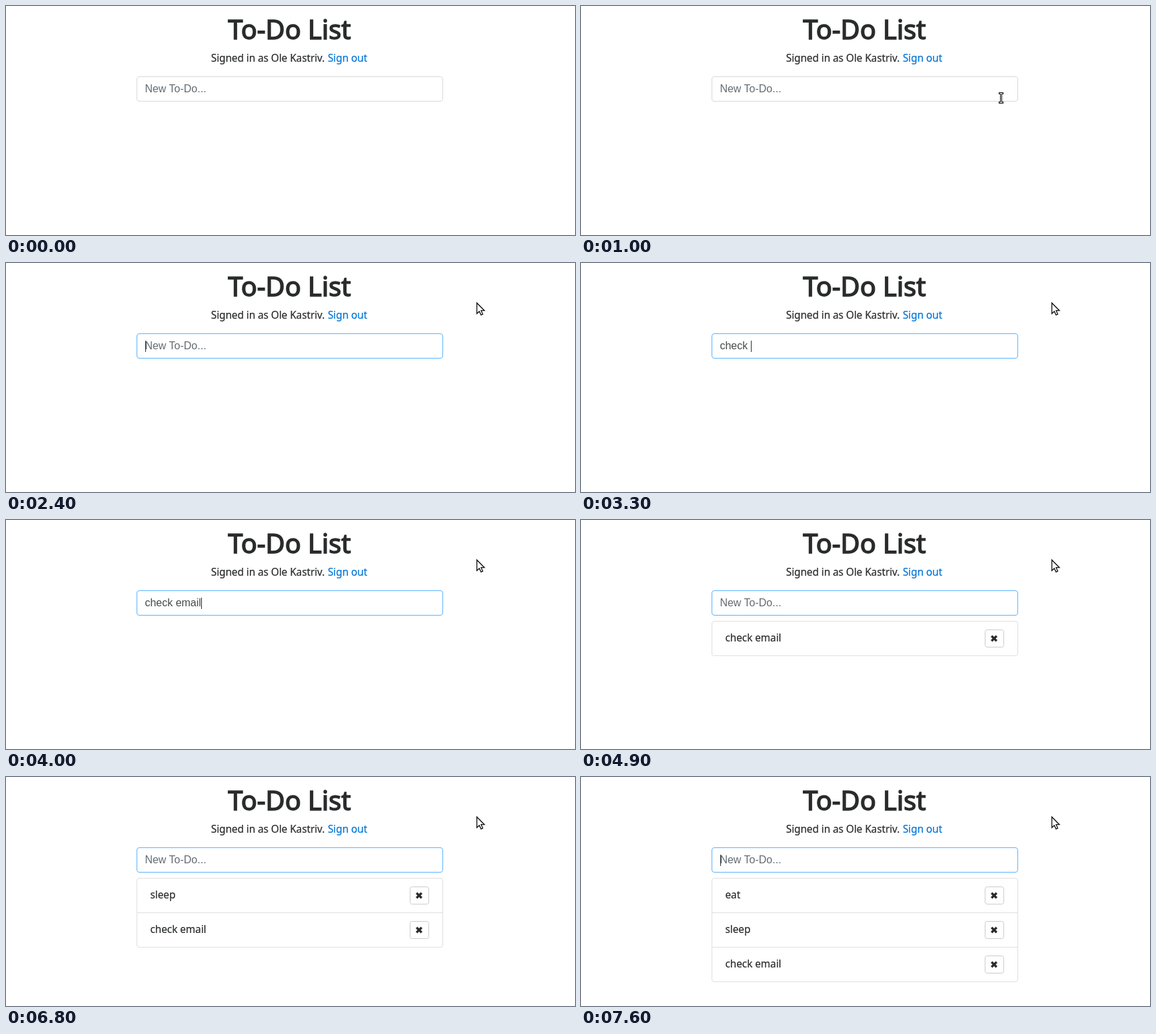
Write an HTML page that moves like this. It is 854 by 345 pixels and loops after 8 s.

```html
<!DOCTYPE html>
<html lang="en">
<head>
<meta charset="utf-8">
<title>To-Do List</title>
<style>
  html, body { margin: 0; width: 100%; height: 100%; overflow: hidden; background: #fff; }
  svg { display: block; }
  text {
    font: 15.4px "Noto Sans", "Open Sans", sans-serif; letter-spacing: -.08px; white-space: pre;
    fill: #292b2c; stroke: #292b2c; stroke-width: .2px;
  }
  #title { font-size: 39.8px; letter-spacing: 0; stroke-width: 1.5px; text-anchor: middle; }
  #link { fill: #0275d8; stroke: #0275d8; }
  #value { font: 16px "Liberation Sans", Arial, sans-serif; letter-spacing: 0; stroke: none; }
  .box { fill: #fff; stroke: #d9d9d9; }
  .list { fill: none; stroke: #dfdfdf; }
  .button { fill: #fff; stroke: #ccc; }
  .cross { stroke: #292b2c; stroke-width: 3.4; }
</style>
</head>
<body>
<svg width="854" height="345" viewBox="0 0 854 345">
  <defs>
    <g id="row">
      <rect class="button" x="606.5" y="165.5" width="28" height="26" rx="3"/>
      <path class="cross" d="M616.2 174.7L623.8 182.3M623.8 174.7L616.2 182.3"/>
    </g>
  </defs>
  <text id="title" x="425.5" y="50">To-Do List</text>
  <text x="307.8" y="84">Signed in as Ole Kastriv.</text>
  <text id="link" x="483" y="84">Sign out</text>
  <rect id="input" class="box" x="196.5" y="106.5" width="459" height="37" rx="3.5"/>
  <text id="value" x="208.4" y="130"></text>
  <rect id="caret" y="117" width="1" height="17" fill="#292b2c"/>
  <g id="rows"></g>
  <rect id="frame" class="list" x="196.5" y="152.5" width="459" rx="3.5"/>
  <path id="arrow" d="M.7 1.2V17.2L4.4 13.9L7 19.4L9.6 18.2L7.1 12.7H12Z"
        fill="#fff" stroke="#111" stroke-width="1.3"/>
  <g id="beam">
    <g transform="translate(-.5 .5)">
      <path d="M-3.5 -7H3.5M0 -7V7M-3.5 7H3.5" stroke="#000" stroke-width="3"/>
      <path d="M-2.5 -7H2.5M0 -7V7M-2.5 7H2.5" stroke="#fff"/>
    </g>
  </g>
</svg>
<script>
const LOOP = 8000, CLICK = 1200, BLINK = 600;
const tasks = [
  { text: "check email", done: 4300,
    keys: [2500, 2800, 2900, 3100, 3200, 3300, 3400, 3600, 3700, 3800, 4000] },
  { text: "sleep", done: 6200, keys: [5100, 5200, 5400, 5600, 5800] },
  { text: "eat", done: 7600, keys: [6900, 7000, 7100] }
];
const events = [CLICK, ...tasks.flatMap(task => [...task.keys, task.done])];
const $ = id => document.getElementById(id);
const show = (el, on) => el.setAttribute("visibility", on ? "visible" : "hidden");
const pen = document.createElement("canvas").getContext("2d");
pen.font = '16px "Liberation Sans", Arial, sans-serif';

function pointerAt(t) {
  const clamp = v => Math.min(1, Math.max(0, v));
  const far = (1 - clamp((t - 400) / 700)) ** 2;
  const p = clamp((t - 1300) / 500), away = p * p * (3 - 2 * p);
  return [629 + 85 * far + 77 * away, 134 + 196 * far - 75 * away].map(Math.round);
}

function drawInput(t) {
  const task = tasks.find(task => t < task.done);
  const typed = task ? task.text.slice(0, task.keys.filter(k => k <= t).length) : "";
  $("value").textContent = typed || "New To-Do...";
  $("value").style.fill = typed ? "#464a4c" : "#636c72";
  $("input").style.stroke = t > CLICK ? "#5cb3fd" : "";
  const last = Math.max(...events.filter(e => e <= t));
  $("caret").setAttribute("x", Math.round(208.9 + pen.measureText(typed).width));
  show($("caret"), t >= CLICK && (t - last) % (2 * BLINK) < BLINK);
}

let shown = -1;
function drawList(t) {
  const done = tasks.filter(task => task.done <= t).reverse();
  if (done.length === shown) return;
  shown = done.length;
  $("rows").innerHTML = done.map((task, i) =>
    `<g transform="translate(0 ${52 * i})"><use href="#row"/>` +
    (i ? '<path class="list" d="M197 152.5H655"/>' : "") +
    `<text x="216.5" y="183">${task.text}</text></g>`).join("");
  $("frame").setAttribute("height", 52 * shown);
  show($("frame"), shown);
}

function drawPointer(t) {
  const [x, y] = pointerAt(t);
  const inside = x < 656 && y >= 106 && y < 144;
  for (const id of ["arrow", "beam"])
    $(id).setAttribute("transform", `translate(${x} ${y})`);
  show($("arrow"), t >= 400 && !inside);
  show($("beam"), t >= 400 && inside);
}

const start = performance.now();
function tick(now) {
  const t = Math.floor(Math.max(0, now - start) % LOOP / 100) * 100;
  drawInput(t);
  drawList(t);
  drawPointer(t);
  requestAnimationFrame(tick);
}
tick(start);
</script>
</body>
</html>
```
